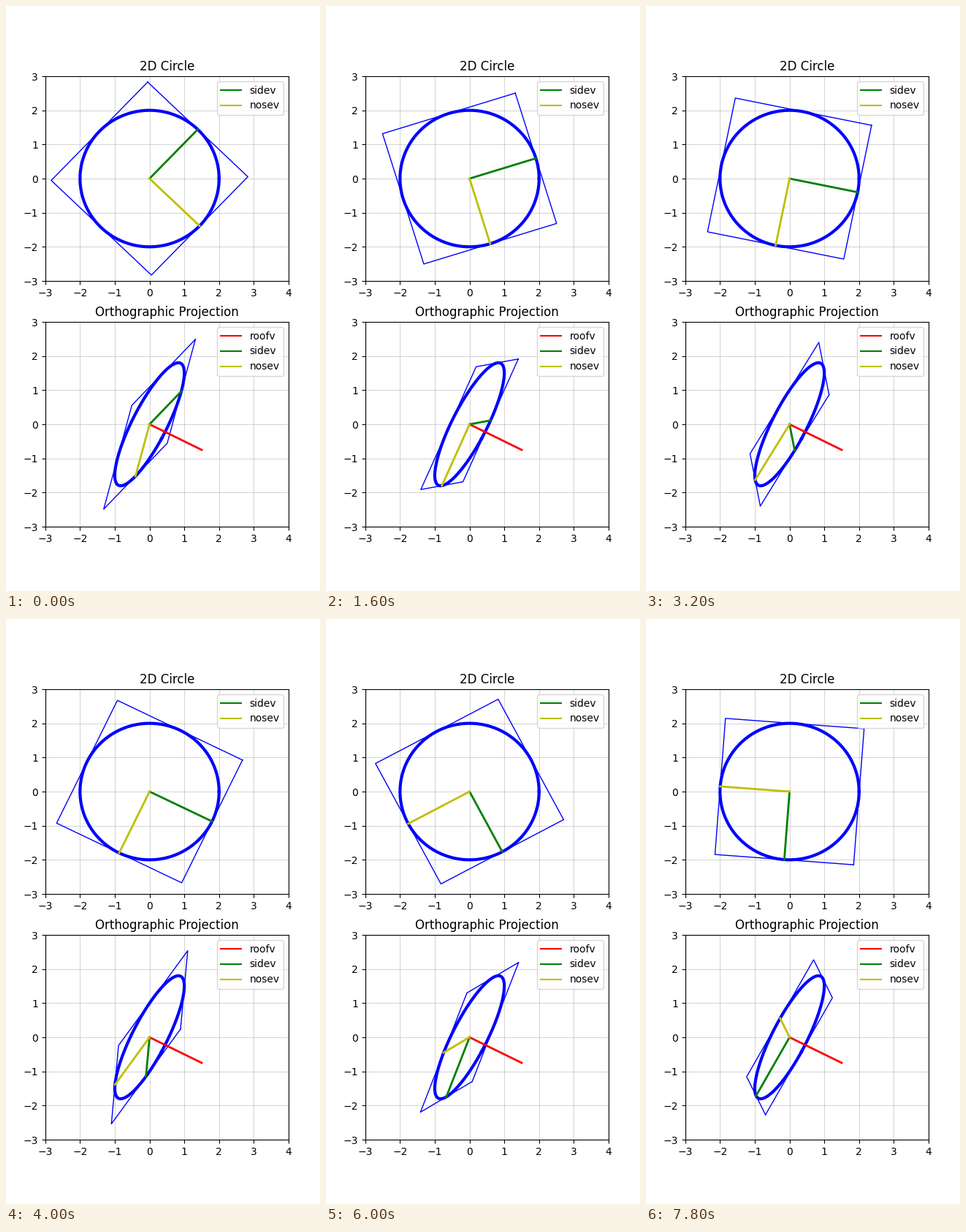
Recreate the animation shown at these times as a matplotlib script. Size 430 px wide and 800 px high, loop 8 s.

```python
import numpy as np
import matplotlib.pyplot as plt
from matplotlib.animation import FuncAnimation

FRAMES, INTERVAL = 40, 200
STEP = 2 * np.pi / 100      # spin per frame
START = 12.8 * STEP
RADIUS = 2
TILT = np.radians(60)
YAW = np.radians(-70)
COLORS = {"roofv": "r", "sidev": "g", "nosev": "y"}


def flat(angle, r=RADIUS):
    return r * np.cos(angle), r * np.sin(angle)


def project(angle, r=RADIUS):
    """Orthographic view of the disc, tilted about y and then about x."""
    x, y = flat(np.asarray(angle) + YAW, r)
    c, s = np.cos(TILT), np.sin(TILT)
    return c * x, s * s * x + c * y


def make_panel(ax, title, names, view):
    ax.set(title=title, xlim=(-3, 4), ylim=(-3, 3))
    ax.set_xticks(range(-3, 5))
    ax.set_yticks(range(-3, 4))
    ax.grid(alpha=0.5)
    ax.plot(*view(np.linspace(0, 2 * np.pi, 200)), "b", lw=3)
    square, = ax.plot([], [], "b", lw=1)
    lines = {n: ax.plot([], [], COLORS[n], lw=2)[0] for n in names}
    keys = [ax.plot([], [], COLORS[n], label=n)[0] for n in names]
    ax.legend(handles=keys, loc="upper right")
    return view, square, lines


def set_vector(line, tip):
    line.set_data([0, tip[0]], [0, tip[1]])


fig, (top, bottom) = plt.subplots(2, 1, figsize=(4.3, 8), dpi=100)
panels = [
    make_panel(top, "2D Circle", ["sidev", "nosev"], flat),
    make_panel(bottom, "Orthographic Projection",
               ["roofv", "sidev", "nosev"], project),
]
set_vector(panels[1][2]["roofv"], (1.5, -0.75))


def update(i):
    side = START - i * STEP
    corners = side + np.pi / 4 + np.arange(5) * np.pi / 2
    for view, square, lines in panels:
        square.set_data(*view(corners, RADIUS * np.sqrt(2)))
        set_vector(lines["sidev"], view(side))
        set_vector(lines["nosev"], view(side - np.pi / 2))
    return []


anim = FuncAnimation(fig, update, frames=FRAMES, interval=INTERVAL,
                     repeat=True, repeat_delay=0, blit=False)
plt.show()
```
